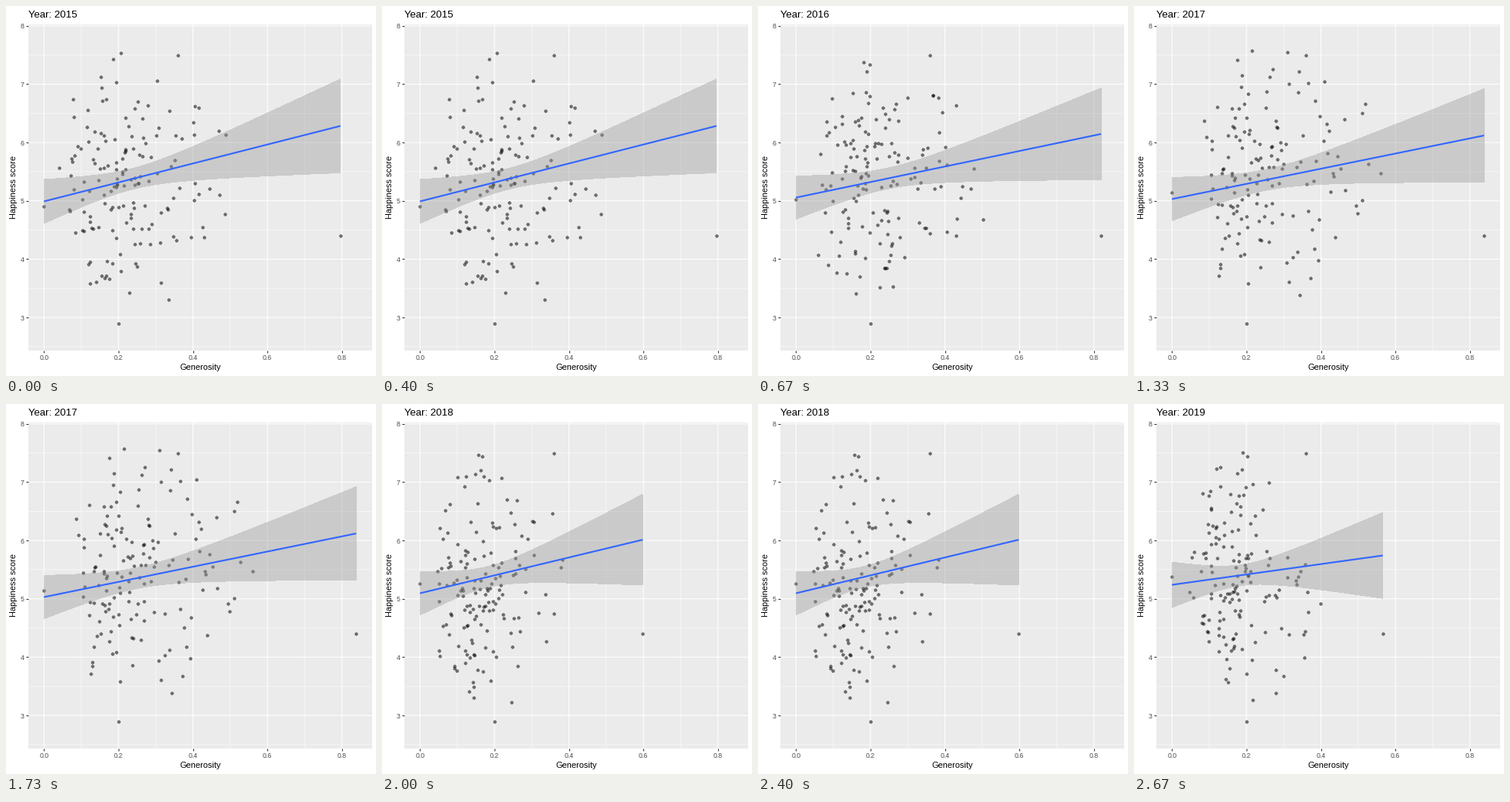
A matplotlib script for the animation above (3330 ms loop, 480 px wide and 480 px high).

```python
import numpy as np
import matplotlib.pyplot as plt
from matplotlib.animation import FuncAnimation
from matplotlib.patches import Polygon

SIZE, DPI = 480, 72
LEFT, RIGHT, TOP, BOTTOM = 29, 474.5, 24, 446.5
XLIM, YLIM = (-0.0419, 0.8800), (2.439, 8.023)
FRAME_MS, FRAMES = 30, 111
YEAR_MS = 2000 / 3
FIRST_YEAR = 2015
COUNTRIES = 156
BAND = 0.178

# Per year: mean x, sd x, fit at x = 0, fit at the largest x, largest x
FITS = [
    (0.237, 0.127, 4.990, 6.284, 0.796),
    (0.243, 0.134, 5.055, 6.146, 0.819),
    (0.247, 0.135, 5.030, 6.120, 0.838),
    (0.181, 0.098, 5.095, 6.013, 0.598),
    (0.185, 0.095, 5.240, 5.743, 0.566),
]

plt.rcParams["font.family"] = "Liberation Sans"


def cloud(n):
    """Seeded countries inside an ellipse, plus the extremes of the year."""
    mean, sd, start, end, x_end = FITS[n]
    extremes = [(x_end, 4.4), (0, 4.9 + 0.12 * n), (0.2, 2.9), (0.36, 7.5)]
    rng = np.random.default_rng(FIRST_YEAR + n)
    x = rng.gamma(4, mean / 4, 2000)
    y = start + (end - start) * x / x_end + rng.normal(0, 1.15, 2000)
    dx, dy = (x - mean - 0.3 * sd) / (2.1 * sd), (y - 5.4) / 2.25
    core = np.column_stack([x, y])[(dx ** 2 + dy ** 2 < 1) & (x > 0.01)]
    return np.vstack([extremes, core[:COUNTRIES - len(extremes)]])


def trend(n):
    """Regression line and half-width of its confidence band."""
    mean, sd, start, end, x_end = FITS[n]
    x = np.linspace(0, x_end, 80)
    fit = start + (end - start) * x / x_end
    return x, fit, BAND * np.hypot(1, (x - mean) / sd)


def label(x, y, text, size, **kw):
    return fig.text(x / SIZE, 1 - y / SIZE, text, fontsize=size,
                    va="baseline", rotation_mode="anchor", **kw)


fig = plt.figure(figsize=(SIZE / DPI, SIZE / DPI), dpi=DPI, facecolor="white")
ax = fig.add_axes([LEFT / SIZE, 1 - BOTTOM / SIZE,
                   (RIGHT - LEFT) / SIZE, (BOTTOM - TOP) / SIZE],
                  facecolor="#EBEBEB", xlim=XLIM, ylim=YLIM)
ax.spines[:].set_visible(False)
ax.set_axisbelow(True)
ax.set_xticks(np.arange(0, 0.9, 0.2), [f"{v / 10:.1f}" for v in range(0, 9, 2)])
ax.set_xticks(np.arange(0.1, 0.8, 0.2), minor=True)
ax.set_yticks(range(3, 9))
ax.set_yticks(np.arange(2.5, 8, 1), minor=True)
ax.grid(which="major", color="white", lw=1.07)
ax.grid(which="minor", color="white", lw=0.53)
ax.tick_params(which="minor", length=0)
ax.tick_params(which="major", length=2.75, width=1.07, color="#333333",
               labelcolor="#4D4D4D", labelsize=8.8, pad=3)
for axis in (ax.xaxis, ax.yaxis):
    for tick in axis.get_major_ticks() + axis.get_minor_ticks():
        tick.gridline.set_snap(False)

title = label(LEFT, 15, "", 13.2)
label((LEFT + RIGHT) / 2, 472, "Generosity", 11, ha="center")
label(13, (TOP + BOTTOM) / 2, "Happiness score", 11, ha="center", rotation=90)

dots = ax.scatter([], [], s=3.6 ** 2, lw=0.75, facecolor=(0, 0, 0, 0.5),
                  edgecolor=(0, 0, 0, 0.5), snap=False, zorder=2)
ribbon = Polygon([(0, 0), (0, 0)], facecolor="#999999", alpha=0.4, lw=0,
                 antialiased=False, zorder=3)
ax.add_patch(ribbon)
line, = ax.plot([], [], color="#3366FF", lw=2.13, solid_capstyle="butt", zorder=4)


def draw(i):
    n = int((i + 0.7) * FRAME_MS / YEAR_MS)
    x, fit, half = trend(n)
    title.set_text(f"Year: {FIRST_YEAR + n}")
    dots.set_offsets(cloud(n))
    line.set_data(x, fit)
    upper = np.column_stack([x, fit + half])
    lower = np.column_stack([x, fit - half])
    ribbon.set_xy(np.vstack([upper, lower[::-1]]))
    return title, dots, ribbon, line


anim = FuncAnimation(fig, draw, frames=FRAMES, interval=FRAME_MS,
                     repeat=True, repeat_delay=0, blit=False)
plt.show()
```
